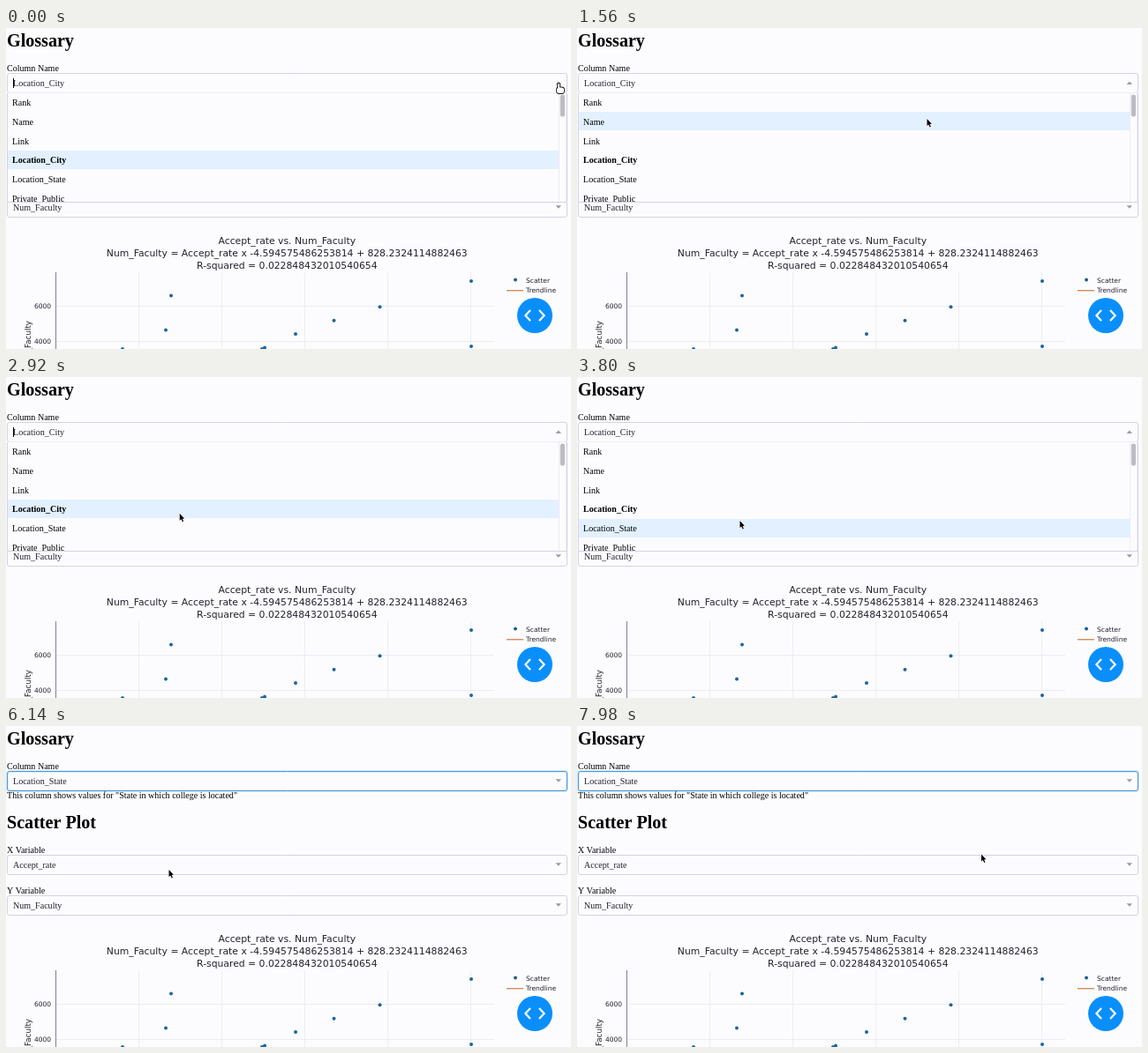
An HTML page with a canvas that plays this animation: 640 px wide and 364 px high, repeating every 8000 ms.

```html
<!DOCTYPE html>
<html lang="en">
<head>
<meta charset="utf-8">
<title>Glossary</title>
<style>
html, body { margin: 0; width: 100%; height: 100%; overflow: hidden; background: #fcfcff; }
canvas { display: block; width: 640px; height: 364px; }
</style>
</head>
<body>
<canvas id="stage" width="640" height="364"></canvas>
<script>
const ctx = document.getElementById('stage').getContext('2d');
const W = 640, H = 364, LOOP = 8000, CLOSE_AT = 5400, TRAVEL = 800;
const PAGE = '#fcfcff', INK = '#000', SOFT = '#20202a', BORDER = '#d3d3e2', FAINT = '#ececf5';
const SERIF = '"Liberation Serif", serif', SANS = '"DejaVu Sans", sans-serif';
const BODY = '10.05px ' + SERIF, BOLD = 'bold ' + BODY, HEAD = 'bold 20.1px ' + SERIF;
const TITLE = '10.8px ' + SANS, SMALL = '7.5px ' + SANS;
const OPTIONS = ['Rank', 'Name', 'Link', 'Location_City', 'Location_State', 'Private_Public'];
const SELECTED = 3, ROW_TOP = 73.5, ROW_H = 21.8, MENU_END = 197;

// Pointer stops, each with the time its move begins
const STOPS = [
  { at: -TRAVEL, x: 626, y: 63 },
  { at: 600, x: 396.5, y: 103 },
  { at: 1600, x: 211, y: 145 },
  { at: 2500, x: 184.5, y: 163 },
  { at: 6700, x: 458, y: 145.5 }
];

function pointerAt(t) {
  let { x, y } = STOPS[0];
  for (const stop of STOPS) {
    const p = Math.min(1, Math.max(0, (t - stop.at) / TRAVEL));
    const e = p * p * (3 - 2 * p);
    x += (stop.x - x) * e;
    y += (stop.y - y) * e;
  }
  return { x, y };
}

function text(str, x, y, font = BODY, color = INK, align = 'left') {
  ctx.font = font;
  ctx.fillStyle = color;
  ctx.textAlign = align;
  ctx.fillText(str, x, y);
}

function rect(x, y, w, h, color) {
  ctx.fillStyle = color;
  ctx.fillRect(x, y, w, h);
}

function disc(x, y, r, color) {
  ctx.beginPath();
  ctx.arc(x, y, r, 0, Math.PI * 2);
  ctx.fillStyle = color;
  ctx.fill();
}

function polyline(...points) {
  ctx.beginPath();
  points.forEach(([x, y]) => ctx.lineTo(x, y));
}

function frame(y, color, width = 1) {
  ctx.beginPath();
  ctx.roundRect(1.5, y + 0.5, 634, 22, 2.5);
  ctx.strokeStyle = color;
  ctx.lineWidth = width;
  ctx.stroke();
}

function triangle(y, dir) {
  polyline([622.6, y - dir * 1.6], [629, y - dir * 1.6], [625.8, y + dir * 1.9]);
  ctx.fillStyle = '#9a9aa6';
  ctx.fill();
}

function select(value, y, focused) {
  if (focused) frame(y, '#dcecff', 3);
  frame(y, focused ? '#4a9bd6' : BORDER);
  text(value, 8, y + 14.6, BODY, SOFT);
  triangle(y + 10.8, 1);
}

function scatter() {
  const dot = (x, y) => disc(x, y, 2, '#1c64a0');
  for (let i = 0; i < 4; i++) dot(293 + 35 * i + 4.25 * i * (i - 1), 362.5 - 15.4 * i);
  for (let i = 0; i < 2; i++) {
    dot(187 - 6 * i, 303.5 + 39 * i);
    dot(527, 287 + 74 * i);
    dot(132 + 158 * i, 364);
  }
}

function plot() {
  const lines = [
    'Accept_rate vs. Num_Faculty',
    'Num_Faculty = Accept_rate x -4.594575486253814 + 828.2324114882463',
    'R-squared = 0.022848432010540654'
  ];
  lines.forEach((line, i) => text(line, 318.3, 245.4 + i * 13.8, TITLE, SOFT, 'center'));

  for (let i = 1; i <= 5; i++) rect(56 + i * 94, 277, 1, 87, FAINT);
  for (let i = 0; i < 2; i++) {
    const y = 315 + i * 40;
    rect(57, y, 496, 1, FAINT);
    text(6000 - i * 2000, 51, y + 3.4, SMALL, SOFT, 'right');
  }
  rect(56, 277, 1, 87, '#80809c');

  ctx.save();
  ctx.translate(28, 332);
  ctx.rotate(-Math.PI / 2);
  text('Num_Faculty', 0, 0, '8.75px ' + SANS, SOFT, 'right');
  ctx.restore();

  scatter();
  disc(577, 285.6, 2, '#1c5f8c');
  text('Scatter', 589, 288.6, SMALL, SOFT);
  rect(567, 297, 19, 1.4, '#d58a5c');
  text('Trendline', 589, 300.4, SMALL, SOFT);
}

function codeButton() {
  disc(599, 326, 20, '#0a8ffa');
  ctx.strokeStyle = '#fff';
  ctx.lineWidth = 2.2;
  for (const side of [-1, 1]) {
    polyline([599 + side * 5, 320], [599 + side * 10.6, 326], [599 + side * 5, 332]);
    ctx.stroke();
  }
}

function menu(active, caret) {
  rect(0, 50, W, MENU_END - 50, PAGE);
  frame(51, BORDER);
  rect(2, 73, 633, MENU_END - 73, PAGE);
  rect(2, 73, 633, 1, FAINT);
  text('Location_City', 8, 65.6, BODY, SOFT);
  if (caret) rect(8, 57, 1, 11, INK);
  triangle(62.4, -1);

  ctx.save();
  ctx.beginPath();
  ctx.rect(0, 74, W, MENU_END - 74);
  ctx.clip();
  rect(2, Math.round(ROW_TOP + active * ROW_H), 624, 21, '#e2f0ff');
  OPTIONS.forEach((name, i) => text(name, 7, 88 + i * ROW_H, i === SELECTED ? BOLD : BODY));
  for (const x of [626, 634]) rect(x, 74, 1, 123, FAINT);
  for (const x of [1, 635]) rect(x, 74, 1, 123, BORDER);
  ctx.beginPath();
  ctx.roundRect(627.8, 75.5, 5.2, 25, 2.6);
  ctx.fillStyle = '#bcbcc2';
  ctx.fill();
  ctx.restore();
  rect(1, MENU_END, 635, 1, BORDER);
}

function outlined(fill, line, width) {
  ctx.lineJoin = 'round';
  ctx.lineWidth = width;
  ctx.strokeStyle = line;
  ctx.stroke();
  ctx.fillStyle = fill;
  ctx.fill();
  ctx.lineJoin = 'miter';
}

function handShape() {
  ctx.beginPath();
  ctx.roundRect(-1, 0, 2.2, 8, 1.1);
  ctx.roundRect(-2, 4.5, 8, 6.5, 2.5);
  outlined('#fff', '#111', 1.8);
}

function arrowShape() {
  polyline([0, 0], [0, 8], [1.8, 6.5], [3.2, 9.6], [4.4, 9], [3.1, 6.1], [5.4, 5.8]);
  ctx.closePath();
  outlined(INK, '#fff', 1.2);
}

function draw(t) {
  const { x, y } = pointerAt(t);
  const inList = y > ROW_TOP && x < 626;
  const active = inList ? Math.floor((y - ROW_TOP) / ROW_H) : SELECTED;

  rect(0, 0, W, H, PAGE);
  text('Glossary', 1, 21.2, HEAD);
  text('Column Name', 1, 48.6);
  select('Num_Faculty', 192, false);
  if (t < CLOSE_AT) {
    menu(active, (t + 90) % 1000 < 500);
  } else {
    select('Location_State', 51, true);
    text('This column shows values for "State in which college is located"', 1, 82.4);
    text('Scatter Plot', 1, 116.2, HEAD);
    text('X Variable', 1, 143.6);
    select('Accept_rate', 146, false);
    text('Y Variable', 1, 189.8);
  }
  plot();
  codeButton();

  ctx.save();
  ctx.translate(x, y);
  if (x > 614) handShape(); else arrowShape();
  ctx.restore();
}

const began = performance.now();
function tick() {
  draw((performance.now() - began) % LOOP);
  requestAnimationFrame(tick);
}
tick();
</script>
</body>
</html>
```
